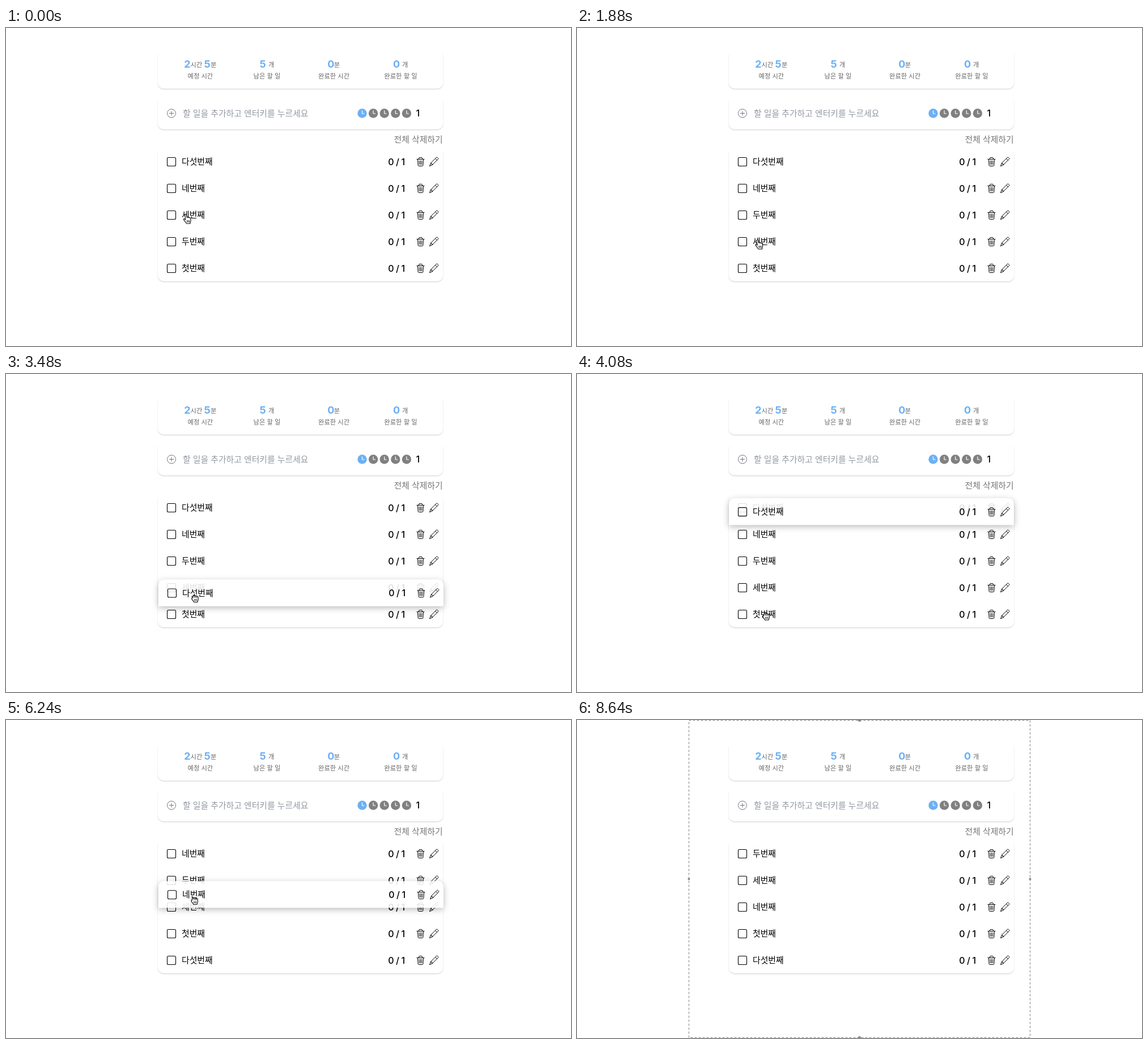
Recreate the animation shown at these times as an HTML page. Size 997 px wide and 561 px high, loop 9.28 s.

```html
<!DOCTYPE html>
<html lang="ko">
<head>
<meta charset="utf-8">
<title>할 일 목록</title>
<style>
html, body { margin: 0; width: 100%; height: 100%; overflow: hidden; background: #fff; }
#stage { position: absolute; left: 0; top: 0; width: 997px; height: 561px; overflow: hidden; }
#stage > * { position: absolute; }
svg { display: block; overflow: visible; }
text { font-family: "Noto Sans CJK KR", "Noto Sans CJK", sans-serif; font-size: 14.85px; white-space: pre; }
.card { left: 268px; width: 503px; border-radius: 10px; box-shadow: 0 1px 2px rgba(0,0,0,.2); clip-path: inset(5px -6px -6px -6px); }
.row { left: 268px; width: 503px; height: 47px; }
.row text { font-weight: 500; }
.row .count { font: 500 16px Inter, sans-serif; letter-spacing: -.35px; }
.num { font: 700 18px Inter, sans-serif; fill: #6cb0f5; }
.small { font-size: 11.3px; fill: #666; }
.line { fill: none; stroke: #000; stroke-width: 1.1; stroke-linejoin: round; stroke-linecap: round; }
.thin { stroke-width: 1; }
#drag { background: rgba(255,255,255,.87); box-shadow: 0 3px 12px rgba(0,0,0,.28); }
#cursor path { fill: #fff; stroke: #000; stroke-width: 1.1; stroke-linejoin: round; stroke-linecap: round; }
#cursor .fold { fill: none; stroke-width: .9; }
</style>
</head>
<body>
<div id="stage">
  <div class="card" style="top:40px;height:67px"></div>
  <div class="card" style="top:122px;height:57px"></div>
  <div class="card" style="top:212px;height:235px"></div>
  <svg id="top" width="997" height="561"></svg>
  <div id="list"></div>
  <div id="drag" class="row"></div>
  <svg id="frame" width="997" height="561" fill="none" stroke="#808080">
    <rect x="197.5" y=".5" width="602" height="560" stroke-dasharray="4 3"/>
    <g fill="#888" stroke="none">
      <circle cx="498.5" cy="0" r="3"/><circle cx="498.5" cy="561" r="3"/>
      <circle cx="197.5" cy="280.5" r="2"/><circle cx="799.5" cy="280.5" r="2"/>
    </g>
  </svg>
  <svg id="cursor" width="16" height="18">
    <g id="point">
      <path d="M4.2 1.8c0-1.6 2.4-1.8 2.7 0l.8 4.4c.4-1 2-1 2.2.2.5-.9 2-.7 2.2.5.7-.7 2-.2 2.1.9l.4 3.2c.2 1.8-.8 2.6-1 4.2v1.8H6.8c-.2-1.8-2.6-3.6-4.4-6.2C1.2 9.2 2.6 8 3.8 9l1.4 1.2z"/>
      <path class="fold" d="M8 11.5v3M10 11.5v3M12 11.5v3"/>
    </g>
    <g id="grab">
      <path d="M3.4 6c-.5-2 1.6-3 2.6-1.6.4-1.4 2.2-1.4 2.6 0 .6-1 2.2-.8 2.4.5.8-.7 2.2-.2 2.2 1.2l.2 3.4c0 2-.9 2.6-1.2 5.5H5.6C5 12.6 2.4 11.4 2 9.2 1.7 7.8 2.4 7 3.6 7.6z"/>
      <path class="fold" d="M6 4.6l.3 2.6M8.6 4.6l.1 2.6M11 5l-.1 2.4M6.6 10v2.6M8.6 10v2.6M10.6 10v2.6"/>
    </g>
  </svg>
</div>
<script>
const LOOP = 9280, TOP = 212, PITCH = 47, SNAP = 360, SETTLE = 160;
const $ = id => document.getElementById(id);

const text = (x, y, s, cls = '', fill = '#000') =>
  `<text x="${x}" y="${y}" class="${cls}"${cls ? '' : ` fill="${fill}"`}>${s}</text>`;

const rowSvg = () => `<svg width="503" height="47">
  <rect class="line" x="16.5" y="16.5" width="15" height="15" rx="2"/>
  <text class="name" x="42" y="29.3"></text>
  <text class="count" x="406.2" y="30">0 / 1</text>
  <path class="line thin" d="M457 19.5h13M460.5 19.5v-1.5q0-1.5 1.5-1.5h3q1.5 0 1.5 1.5v1.5M458.3 19.5l.8 10.6q.1 1.4 1.5 1.4h5.8q1.4 0 1.5-1.4l.8-10.6M461 22l.3 6.8M463.5 22v6.8M466 22l-.3 6.8"/>
  <path class="line thin" d="M479.6 31.4l2-5.2 10-10q.7-.6 1.4 0l1.6 1.6q.7.7 0 1.4l-10 10zM489.5 18.3l3 3M481.6 26.4l1.2.4v1.4h1.4l.5 1.2"/>
</svg>`;

const clock = (cx, color) => `<circle cx="${cx}" cy="150.5" r="8.2" fill="${color}"/>
  <path d="M${cx} 145.5v5.5h4" fill="none" stroke="#fff" stroke-width="1.2"/>`;

$('top').innerHTML =
  [[314.2, '2'], [349.4, '5'], [447.6, '5'], [567.2, '0'], [683, '0']].map(([x, s]) => text(x, 70.4, s, 'num')).join('') +
  [[325.5, '시간'], [361, '분'], [463, '개'], [578.8, '분'], [699, '개']].map(([x, s]) => text(x, 69.4, s, 'small')).join('') +
  [[320.5, '예정 시간'], [436.5, '남은 할 일'], [551, '완료한 시간'], [667.3, '완료한 할 일']].map(([x, s]) => text(x, 89.3, s, 'small')).join('') +
  '<path d="M284.5 150.5a7.5 7.5 0 1 0 15 0a7.5 7.5 0 1 0 -15 0M288 150.5h8M292 146.5v8" fill="none" stroke="#6f7480"/>' +
  text(312, 155.9, '할 일을 추가하고 엔터키를 누르세요', '', '#9298a3') +
  [0, 1, 2, 3, 4].map(i => clock(628.5 + i * 19.6, i ? '#808080' : '#6cb0f5')).join('') +
  '<text x="723.6" y="156.3" style="font:500 16px Inter,sans-serif">1</text>' +
  text(684.6, 202, '전체 삭제하기', '', '#777');

const rows = [0, 1, 2, 3, 4].map(i => {
  const el = document.createElement('div');
  el.className = 'row';
  el.style.cssText = `position:absolute;top:${TOP + i * PITCH}px`;
  el.innerHTML = rowSvg();
  $('list').append(el);
  return el.querySelector('.name');
});
$('drag').innerHTML = rowSvg();
const dragName = $('drag').querySelector('.name');

// Pointer stops: time, x, y
const path = [
  [200, 319.5, 337], [600, 321, 382], [2040, 321, 382], [2640, 333, 246],
  [3040, 333, 246], [3640, 334, 428], [4960, 334, 428], [5160, 333, 250],
  [5360, 333, 250], [5520, 333, 247], [5880, 333, 247], [6380, 333, 336],
  [8320, 333, 336], [8620, 278, 546]
];
const drags = [
  { from: 2, to: 3, start: 240, release: 920, dx: 2.4, lag: -4 },
  { from: 0, to: 4, start: 3080, release: 3764, dx: 1, lag: 0 },
  { from: 0, to: 2, start: 5920, release: 6440, dx: 1, lag: 0 }
];
const names = ['다섯번째', '네번째', '세번째', '두번째', '첫번째'];

const ease = u => { u = Math.min(1, Math.max(0, u)); return u * u * (3 - 2 * u); };

function pointer(t) {
  const i = path.findIndex(p => p[0] > t);
  if (i === 0) return path[0].slice(1);
  if (i < 0) return path[path.length - 1].slice(1);
  const [a, b] = [path[i - 1], path[i]];
  const k = ease((t - a[0]) / (b[0] - a[0]));
  return [a[1] + (b[1] - a[1]) * k, a[2] + (b[2] - a[2]) * k];
}

function render(t) {
  const order = [...names];
  let active = null;
  for (const d of drags) {
    if (t < d.start) break;
    if (t < d.release + SNAP + SETTLE) { active = d; break; }
    order.splice(d.to, 0, order.splice(d.from, 1)[0]);
  }
  rows.forEach((el, i) => { if (el.textContent !== order[i]) el.textContent = order[i]; });

  const box = $('drag').style;
  box.display = active ? 'block' : 'none';
  if (active) {
    const d = active, since = t - d.release;
    const left = 1 - ease(since / SNAP);
    const shift = pointer(Math.min(t, d.release))[1] - pointer(d.start - 40)[1] + d.lag;
    const dx = d.dx * ease((t - d.start) / 300) * left;
    box.top = TOP + d.from * PITCH + 'px';
    box.transform = `translate(${dx}px, ${shift * left}px)`;
    box.borderRadius = d.from ? '0' : '10px 10px 0 0';
    box.opacity = 1 - Math.min(1, Math.max(0, since - SNAP) / SETTLE);
    dragName.textContent = order[d.from];
  }

  const [x, y] = pointer(t);
  const grabbing = (t >= 3080 && t < 4980) || t >= 5920;
  $('cursor').style.transform = `translate(${x - 8}px, ${y - 9}px)`;
  $('cursor').style.display = t < 8640 ? 'block' : 'none';
  $('point').style.display = grabbing ? 'none' : 'inline';
  $('grab').style.display = grabbing ? 'inline' : 'none';
  $('frame').style.display = t >= 7880 ? 'block' : 'none';
}

const t0 = performance.now();
function tick() {
  render((performance.now() - t0) % LOOP);
  requestAnimationFrame(tick);
}
tick();
</script>
</body>
</html>
```
